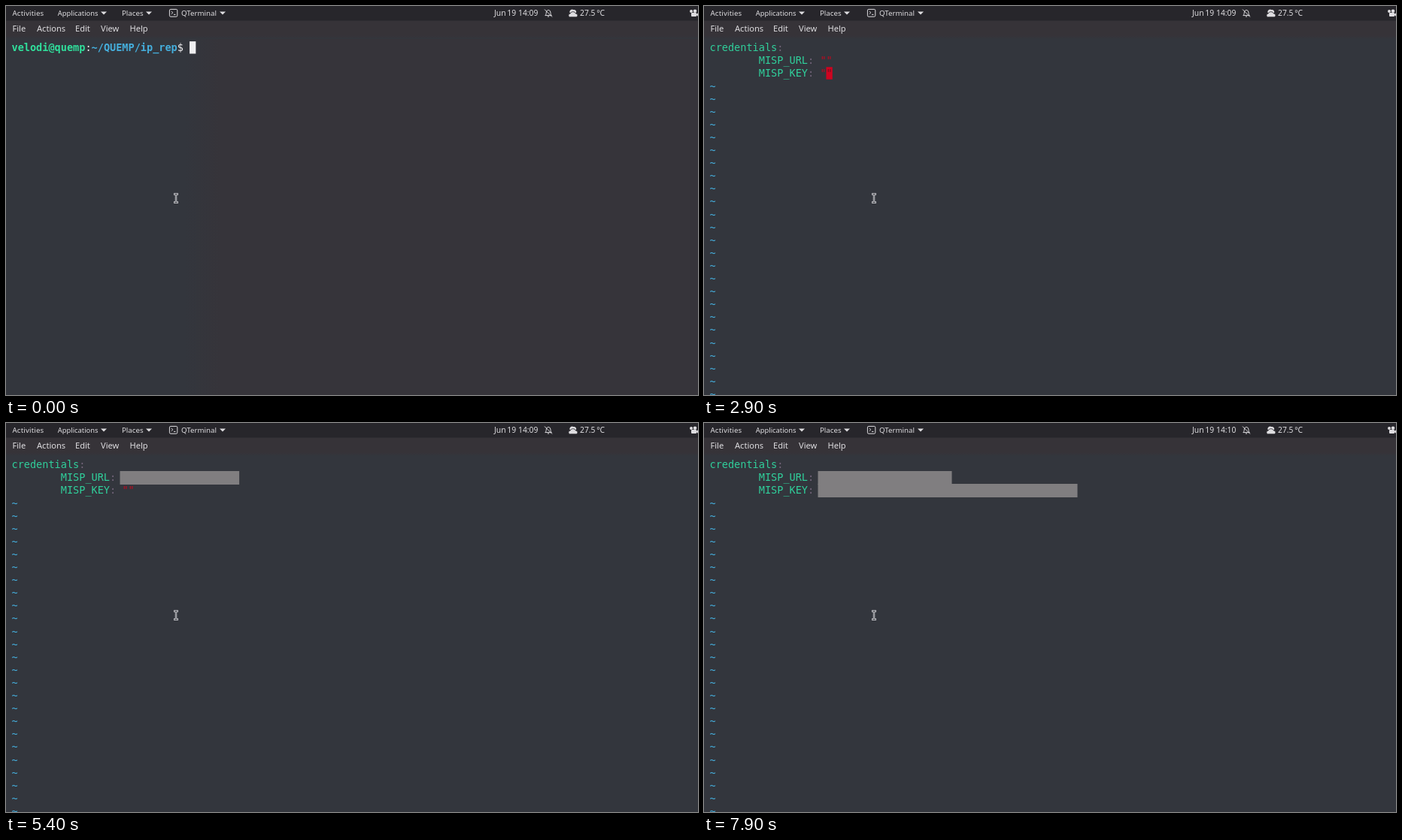
Animation, 920 px wide and 518 px high, one loop 8000 ms. Source, as an HTML page:

```html
<!DOCTYPE html>
<html lang="en">
<head>
<meta charset="utf-8">
<title>Terminal session</title>
<style>
  html, body { margin: 0; width: 100%; height: 100%; overflow: hidden; background: #33363d; }
  svg { display: block; width: 100vw; height: 100vh; }
  text { white-space: pre; }
  .mono { font: 13.55px "DejaVu Sans Mono", "Noto Sans Mono", monospace; }
  .bold { font-weight: 700; }
  .ui { font-family: "Noto Sans", "Open Sans", sans-serif; fill: #dedde0; }
</style>
</head>
<body>
<svg viewBox="0 0 920 518" xmlns="http://www.w3.org/2000/svg">
  <defs>
    <linearGradient id="warm">
      <stop offset=".26" stop-color="#36343a" stop-opacity="0"/>
      <stop offset=".31" stop-color="#36343a"/>
    </linearGradient>
    <linearGradient id="menu" x2="0" y2="1">
      <stop offset=".8" stop-color="#363338"/>
      <stop offset="1" stop-color="#33363d"/>
    </linearGradient>
  </defs>
  <rect width="920" height="518" fill="#33363d"/>
  <rect id="tint" y="42" width="920" height="476" fill="url(#warm)"/>
  <rect y="19" width="920" height="25" fill="url(#menu)"/>
  <rect width="920" height="19.5" fill="#27262b"/>

  <g class="ui" font-size="9.7" font-weight="500">
    <text x="8.5" y="13" letter-spacing=".15">Activities</text>
    <text x="68.7" y="13" font-size="9.4">Applications</text>
    <text x="154" y="13">Places</text>
    <text x="233" y="13">QTerminal</text>
    <text x="649" y="13" font-size="10.3">Jun&#x2009;19</text>
    <text id="clock" x="681" y="13" font-size="10.3"></text>
    <text x="763" y="13" font-size="10.3">27.5&#x2009;°C</text>
  </g>
  <g class="ui" font-size="11.1">
    <text x="8.5" y="34">File</text>
    <text x="41" y="34">Actions</text>
    <text x="92" y="34">Edit</text>
    <text x="126" y="34">View</text>
    <text x="164.5" y="34">Help</text>
  </g>

  <g fill="#dedde0">
    <path d="M126 7.5h8l-4 4zM186 7.5h8l-4 4zM284 7.5h8l-4 4z"/>
    <path d="M749.5 9a3.4 3.4 0 0 1 5-4 3 3 0 0 1 3.500 4z"/>
    <path d="M749.500 14.800a2.400 2.400 0 0 1 .6-4.700 4 4 0 0 1 7.400 0 2.400 2.400 0 0 1 .8 4.700z" stroke="#27262b" stroke-width=".8"/>
    <rect x="911" y="9" width="7" height="5" rx="1"/>
    <circle cx="911" cy="7" r="2"/>
    <circle cx="916" cy="6.700" r="2.300"/>
    <path d="M917 11.500l3-2.300v4.600z"/>
  </g>
  <g fill="none" stroke="#dedde0">
    <rect x="217.400" y="4.400" width="10.400" height="9.800" rx="1.500"/>
    <path d="M219.800 7l2 1.900-2 1.900M223 11.400h2.500"/>
    <path d="M716.800 12.600c1.500-1 1.200-3 1.600-4.600.6-3.400 4.800-3.400 5.400 0 .4 1.600.1 3.600 1.600 4.600zM720 14h2M716 4.500l10 10"/>
  </g>

  <g id="screen"></g>
  <g fill="#807e80">
    <rect id="urlMask" x="151.5" y="64" height="18"/>
    <rect id="keyMask" x="151.5" y="81" height="18"/>
  </g>
  <g fill="none">
    <path d="M223 250.500h6M223 261.500h6M226 250v12" stroke="#d8d8dc" stroke-width="2.400"/>
    <path d="M223.700 250.500h4.600M223.700 261.500h4.600M226 250.500v11" stroke="#25262b" stroke-width=".7"/>
  </g>
</svg>
<script>
const LOOP = 8000;
const COL = 8.16, ROW = 17.1, LEFT = 7.5, BASE = 60.2;
const GREEN = '#30e09c', BLUE = '#45aedc', WHITE = '#efeff1';
const KEY = '#30cf9b', COLON = '#73657a', RED = '#c0091f', BLOCK = '#cf0420';
const $ = id => document.getElementById(id);

const run = (col, row, str, fill, bold) =>
  `<text class="mono${bold ? ' bold' : ''}" x="${LEFT + col * COL}" y="${BASE + row * ROW}" fill="${fill}">${str}</text>`;

const block = (col, row, fill) =>
  `<rect x="${LEFT + col * COL - 0.1}" y="${47.1 + row * ROW}" width="8.3" height="16.4" fill="${fill}"/>`;

const prompt = (row, typed, active) =>
  run(0, row, 'velodi@quemp', GREEN, true) + run(12, row, ':', WHITE) +
  run(13, row, '~/QUEMP/ip_rep', BLUE, true) + run(27, row, '$ ' + typed, WHITE) +
  (active ? block(29 + typed.length, row, WHITE) : '');

// Directory listing: [name, colour]
const FILES = [
  ['config.yaml', WHITE], ['database_connector', BLUE], ['db', WHITE],
  ['db.sqlite3', WHITE], ['feed_ingestor', BLUE], ['front_end_scorer', BLUE],
  ['__init__.py', WHITE], ['ip_rep', BLUE], ['manage.py', GREEN]
];

function listing(row) {
  let col = 0;
  return FILES.map(([name, fill]) => {
    const out = run(col, row, name, fill, fill !== WHITE);
    col += name.length + 2;
    return out;
  }).join('');
}

// Latest text from [start time, text] steps
const typedAt = (steps, t) => steps.reduce((s, [at, str]) => t >= at ? str : s, '');

const LS = [[500, 'l'], [600, 'ls']];
const VIM = [[1500, 'v'], [1700, 'vi'], [1800, 'vim'], [2000, 'vim '], [2100, 'vim c'],
  [2200, 'vim co'], [2400, 'vim con'], [2600, 'vim config.yaml ']];

function shell(t) {
  if (t < 800) return prompt(0, typedAt(LS, t), true);
  return prompt(0, 'ls', false) + listing(1) + prompt(2, typedAt(VIM, t), true);
}

function field(row, name, active) {
  return run(8, row, name, KEY) + run(16, row, ':', COLON) + run(18, row, '""', RED) +
    (active ? block(19, row, BLOCK) + run(19, row, '"', '#6d1222') : '');
}

function editor(t) {
  const onUrl = t >= 3200 && t < 6000;
  let out = run(0, 0, 'credentials', KEY) + run(11, 0, ':', COLON) +
    field(1, 'MISP_URL', onUrl) + field(2, 'MISP_KEY', !onUrl);
  for (let row = 3; row < 28; row++) out += run(0, row, '~', BLUE);
  return out;
}

let last = '';
function render(t) {
  const html = t < 2800 ? shell(t) : editor(t);
  if (html !== last) $('screen').innerHTML = last = html;
  $('clock').textContent = t < 5800 ? '14:09' : '14:10';
  $('tint').setAttribute('opacity', Math.max(0, 1 - t / 1300));
  const url = t < 4050 ? 0 : Math.min(178, 43 + (t - 4300) * 0.105);
  $('urlMask').setAttribute('width', url);
  $('keyMask').setAttribute('width', t < 6700 ? 0 : 345);
}

const start = performance.now();
function tick() {
  render((performance.now() - start) % LOOP);
  requestAnimationFrame(tick);
}
tick();
</script>
</body>
</html>
```
